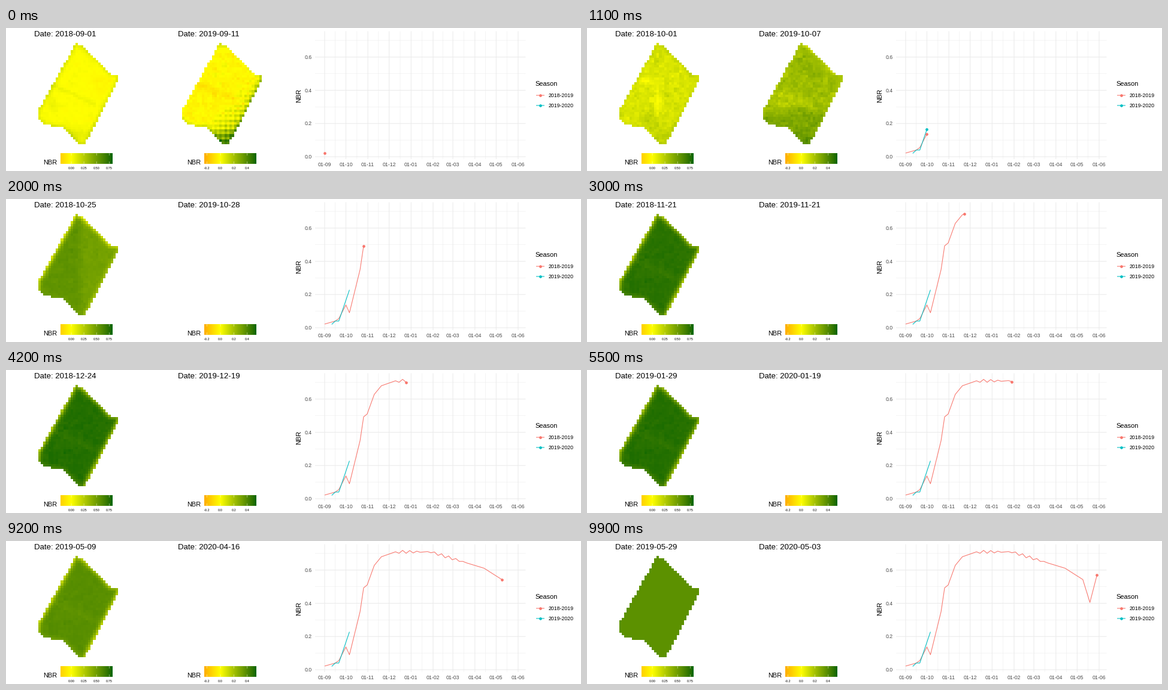
These frames come from a looping animation (960x240 px, 10000 ms). A matplotlib script:

```python
import numpy as np
import matplotlib.pyplot as plt
from matplotlib.animation import FuncAnimation
from matplotlib.colors import to_rgb
from matplotlib.patches import Rectangle
from matplotlib.path import Path

W, H, N = 960, 240, 100
plt.rcParams["font.family"] = "Liberation Sans"
RED, TEAL, GRID, GREY = "#F8766D", "#00BFC4", "#EBEBEB", "#4D4D4D"

# At 72 dpi one point is one pixel; the axes use pixel coordinates.
fig = plt.figure(figsize=(W / 72, H / 72), dpi=72, facecolor="white")
ax = fig.add_axes([0, 0, 1, 1])


def fade(x, a, b):
    return np.clip((x - a) / (b - a), 0, 1)


# ---- diverging colour scale, blended in Lab space ----
XYZ = np.array([[0.4339, 0.3762, 0.1899],
                [0.2126, 0.7152, 0.0722],
                [0.0178, 0.1095, 0.8727]])


def to_lab(name):
    c = np.array(to_rgb(name))
    lin = np.where(c > 0.04045, ((c + 0.055) / 1.055) ** 2.4, c / 12.92)
    x, y, z = np.cbrt(XYZ @ lin)
    return np.array([116 * y - 16, 500 * (x - y), 200 * (y - z)])


LOW, MID, HIGH = map(to_lab, ("red", "yellow", "darkgreen"))


def ramp(v):
    """Map values in -1..1 to red, yellow, dark green."""
    v = np.clip(np.asarray(v, float), -1, 1)[..., None]
    lab = MID + np.where(v < 0, -v * (LOW - MID), v * (HIGH - MID))
    y = (lab[..., 0] + 16) / 116
    xyz = np.stack([y + lab[..., 1] / 500, y, y - lab[..., 2] / 200], -1) ** 3
    rgb = np.clip(xyz @ np.linalg.inv(XYZ).T, 0, 1)
    return np.where(rgb > 0.0031308,
                    1.055 * np.maximum(rgb, 1e-9) ** (1 / 2.4) - 0.055,
                    12.92 * rgb)


# ---- field raster ----
COLS, ROWS, CELL, X0, Y0 = 32, 41, 4.13, 54, 26.1
col, row = np.meshgrid(np.arange(COLS), np.arange(ROWS))
X, Y = X0 + (col + 0.5) * CELL, Y0 + (row + 0.5) * CELL

# Upper right, lower right, bottom and left side, clockwise.
SIDES = [[(118, 24), (121, 28), (145, 47.5), (174, 78)],
         [(186.5, 79.5), (186.3, 88)],
         [(130.5, 197), (121, 193), (96, 168), (66, 163)],
         [(53, 152), (54, 139)]]
inside = Path(sum(SIDES, [])).contains_points(
    np.c_[X.ravel(), Y.ravel()]).reshape(X.shape)


def edge(*weights):
    """Strip along the border, one weight for each side."""
    out = np.zeros(X.shape)
    for k, w in enumerate(weights):
        pts = np.array(SIDES[k] + SIDES[(k + 1) % 4][:1], float)
        for a, d in zip(pts, np.diff(pts, axis=0)):
            t = ((X - a[0]) * d[0] + (Y - a[1]) * d[1]) / (d @ d)
            t = np.clip(t, 0, 1)
            dist = np.hypot(X - a[0] - t * d[0], Y - a[1] - t * d[1]) / CELL
            out = np.maximum(out, w * np.exp(-dist ** 1.5))
    return out


def blob(x, y, sx, sy):
    return np.exp(-((X - x) / sx) ** 2 - ((Y - y) / sy) ** 2)


def band(y, width):
    return np.exp(-((Y - y - 0.45 * (X - 80)) / width) ** 2)


rng = np.random.default_rng(7)


def noise():
    blocks = np.kron(rng.normal(size=(21, 16)), np.ones((2, 2)))[:ROWS]
    return 0.7 * blocks + 0.6 * rng.normal(size=X.shape)


def centred(a):
    return a - a[inside].mean()


september = centred(0.012 * noise() + 0.05 * band(98, 4) * (X < 150)
                    + 0.05 * blob(78, 130, 10, 15)
                    - 0.04 * blob(160, 95, 20, 25)
                    + 0.07 * blob(115, 180, 28, 14)
                    + 0.12 * edge(1, 1, 1, 1))
october = centred(0.03 * noise() - 0.12 * blob(100, 90, 13, 8)
                  - 0.11 * blob(118, 125, 6, 22)
                  + 0.10 * blob(105, 156, 14, 12)
                  + 0.10 * blob(126, 183, 16, 14)
                  + 0.05 * blob(115, 45, 12, 14)
                  + 0.10 * edge(1, 0.6, 0.4, 0.3))
growth = centred(0.012 * noise() + 0.035 * np.tanh((124 - X) / 6)
                 - 0.32 * edge(1.2, 0.5, 0.15, 1.3))
winter = centred(0.012 * noise() - 0.03 * band(103, 6)
                 - 0.42 * edge(1, 1, 0.25, 1.1))

wet = fade(X + Y, 245, 305)
autumn_a = (-0.025 + 0.02 * noise() - 0.05 * band(95, 7)
            + wet * (0.14 * (row % 2) + 0.08 * (col % 2) - 0.02)
            + 0.28 * blob(126, 190, 26, 18) + 0.07 * blob(124, 65, 4, 6)
            + 0.12 * blob(118, 28, 8, 8) + 0.2 * edge(0.2, 1, 0.6, 0.1))
autumn_b = (0.22 + 0.025 * noise() + 0.10 * blob(130, 192, 15, 14)
            + 0.08 * fade(Y, 128, 148) - 0.05 * blob(85, 130, 22, 20)
            + 0.04 * blob(130, 65, 20, 20) - 0.04 * band(108, 6)
            - 0.10 * edge(1, 0.4, 0, 0.3))


# ---- time series: a visit every five days since 1 September ----
KEYS1 = [(0, .022), (15, .040), (20, .055), (30, .137), (35, .09), (50, .35),
         (55, .493), (60, .51), (70, .628), (80, .68), (100, .71),
         (150, .709), (205, .637), (225, .611), (250, .543), (260, .405),
         (270, .57)]
KEYS2 = [(10, .02), (15, .04), (20, .04), (35, .228)]


def series(keys):
    d, v = np.transpose(keys)
    days = np.arange(d[0], d[-1] + 1, 5)
    return days, np.interp(days, d, v)


days1, nbr1 = series(KEYS1)
days2, nbr2 = series(KEYS2)
# Small winter zigzag whose phase slips by half a turn in two months.
nbr1 += (0.009 * np.cos(11 * np.pi / 60 * (days1 - 110))
         * ((days1 > 100) & (days1 < 205)))


def px(day):
    return 532 + 1.1832 * day


def py(v):
    return 216 - 278.7 * v


def steps(days, span=270):
    """Each observation falls on the nearest animation step."""
    return np.rint(days * (N - 1) / span)


def text(x, y, s, size, color="black", ha="left", va="baseline", **kw):
    return ax.text(x, y, s, fontsize=size, color=color, ha=ha, va=va, **kw)


def line(xs, ys, color, lw, **kw):
    return ax.plot(xs, ys, color=color, lw=lw, snap=False,
                   solid_capstyle="butt", solid_joinstyle="round", **kw)[0]


def dot(xs, ys, color):
    return ax.plot(xs, ys, "o", color=color, ms=4.7, mew=0, snap=False,
                   zorder=5)[0]


class Map:
    def __init__(self, dx, start, span, zero, scale, ticks, fmt):
        self.start, self.span = np.datetime64(start), span
        left, right = 91 + dx, 178 + dx
        self.top = (right - zero) / scale
        self.title = text(47 + dx, 14, "", 13.2)
        self.img = ax.imshow(
            np.zeros((ROWS, COLS, 4)), interpolation="nearest", aspect="auto",
            extent=(X0 + dx, X0 + dx + COLS * CELL, Y0 + ROWS * CELL, Y0))
        v = (np.linspace(left, right, 174) - zero) / scale / self.top
        bar = ax.imshow(ramp(v)[None], aspect="auto", interpolation="nearest",
                        extent=(left, right, 228, 210))
        bar.set_clip_path(Rectangle((left + 0.4, 210.3), 86.4, 17.3,
                                    transform=ax.transData))
        text(62.6 + dx, 229, "NBR", 11)
        for t in ticks:
            x = zero + t * scale
            for y in (210.3, 224.1):
                line([x, x], [y, y + 3.5], "white", 0.5)
            text(x, 237, fmt % t, 5.5, ha="center")

    def update(self, f, field):
        day = self.span * f // (N - 1)
        self.title.set_text(f"Date: {self.start + day}")
        self.img.set_visible(field is not None)
        if field is not None:
            self.img.set_data(np.dstack([ramp(field / self.top), inside]))


class Series:
    def __init__(self, days, values, color):
        self.t, self.x, self.y = steps(days), px(days), py(values)
        self.line = line([], [], color, 1.07, zorder=4)
        self.dot = dot([], [], color)

    def update(self, f):
        seen = self.t <= f
        xs, ys = self.x[seen], self.y[seen]
        head = [], []
        if self.t[0] <= f <= self.t[-1]:
            head = ([np.interp(f, self.t, self.x)],
                    [np.interp(f, self.t, self.y)])
        self.dot.set_data(*head)
        self.line.set_data(np.append(xs, head[0]), np.append(ys, head[1]))


# ---- chart background ----
L, R, T, B = 516, 867.5, 5.5, 220
MAJOR, MINOR = 1.07, 0.53


def vgrid(day, lw):
    line([px(day)] * 2, [T, B], GRID, lw, zorder=1)


months = np.arange("2018-09", "2019-07", dtype="datetime64[M]")
firsts = (months.astype("datetime64[D]")
          - np.datetime64("2018-09-01")).astype(int)
for m, d in zip(months, firsts):
    vgrid(d, MAJOR)
    text(px(d), 232.3, f"01-{str(m)[-2:]}", 8.8, GREY, "center")
for d in (firsts[1:] + firsts[:-1]) / 2:
    vgrid(d, MINOR)
for k in range(8):
    y = py(k / 10)
    line([L, R], [y, y], GRID, MINOR if k % 2 else MAJOR, zorder=1)
    if k % 2 == 0:
        text(511, y + 3.2, f"{k / 10:.1f}", 8.8, GREY, "right")
text(489.5, 113, "NBR", 11, ha="center", va="center", rotation=90)

text(883, 97, "Season", 11)
for y, c, s in ((113, RED, "2018-2019"), (130, TEAL, "2019-2020")):
    line([885, 899], [y, y], c, 1.07)
    dot([892], [y], c)
    text(906, y + 3.2, s, 8.8)

season1, season2 = Series(days1, nbr1, RED), Series(days2, nbr2, TEAL)
map1 = Map(0, "2018-09-01", 270, 109, 84.3, (0, .25, .5, .75), "%.2f")
map2 = Map(240, "2019-09-11", 235, 358, 112, (-.2, 0, .2, .4), "%.1f")
ax.set(xlim=(0, W), ylim=(H, 0))
ax.axis("off")


def first_field(f):
    day = np.interp(f, season1.t, days1)
    return (np.interp(f, season1.t, nbr1)
            + september * (1 - fade(day, 0, 30))
            + october * (fade(day, 0, 30) - fade(day, 35, 50))
            + growth * (fade(day, 35, 55) - fade(day, 60, 80))
            + winter * fade(day, 60, 80) * (1 - 0.2 * fade(day, 115, 190))
            * (1 - fade(day, 250, 270)))


def second_field(f):
    """Clear views end with the fourth visit, 25 days in."""
    visits = steps(np.array([0, 5, 10, 25]), 235)
    if f > visits[-1]:
        return None
    s = np.interp(f, visits, [0, 0.1, 0.1, 1])
    return autumn_a * (1 - s) + autumn_b * s


def update(f):
    map1.update(f, first_field(f))
    map2.update(f, second_field(f))
    season1.update(f)
    season2.update(f)
    return []


anim = FuncAnimation(fig, update, frames=N, interval=100, repeat=True,
                     repeat_delay=0, init_func=lambda: update(0))
plt.show()
```
